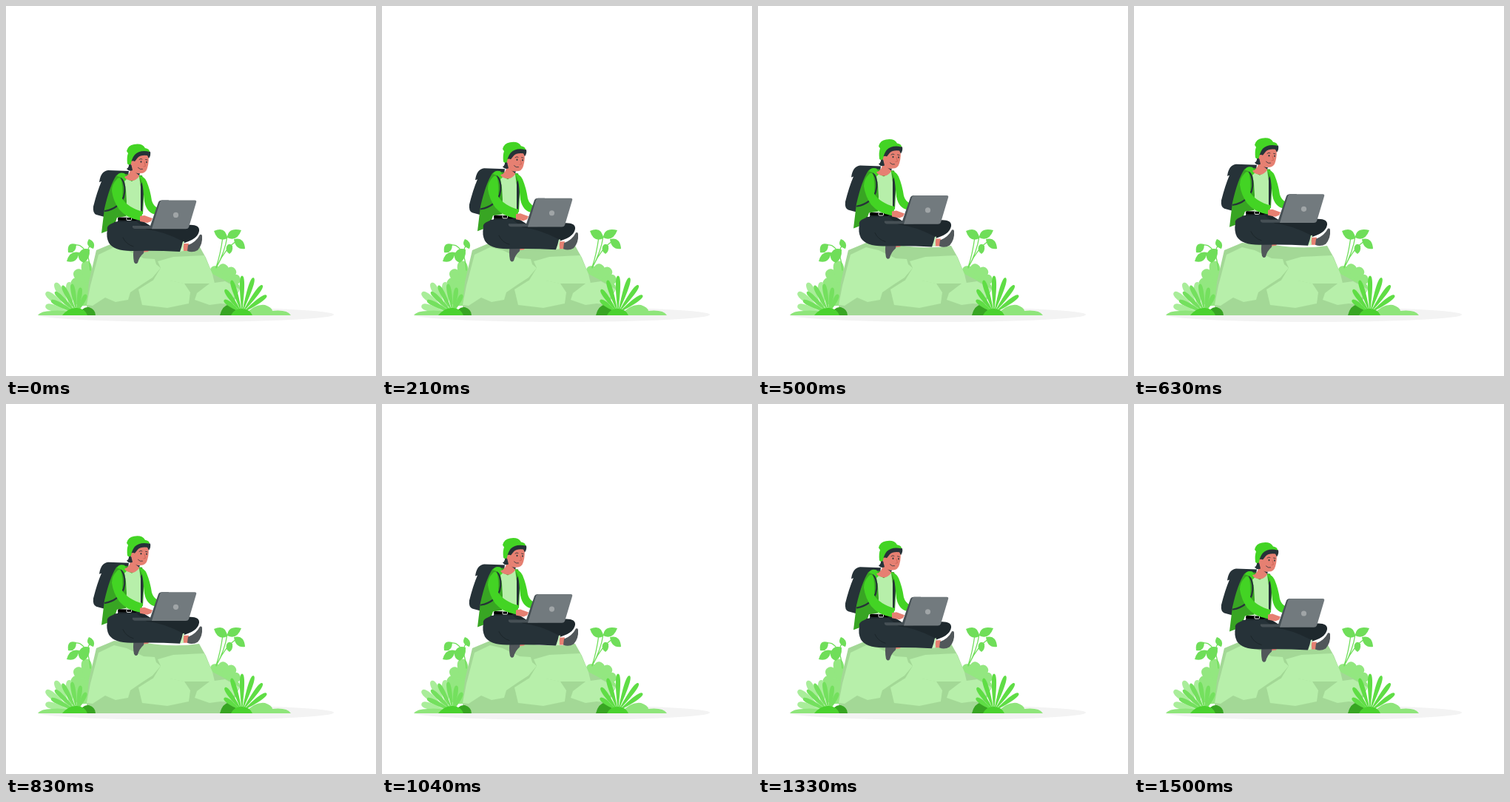
Recreate the animation shown at these times as an HTML page. Size 500 px wide and 500 px high, loop 1540 ms.

```html
<!DOCTYPE html>
<html lang="en">
<head>
<meta charset="utf-8">
<title>Working outdoors</title>
<style>
  html, body { margin: 0; width: 100%; height: 100%; overflow: hidden; background: #fff; }
  svg { display: block; width: 100%; height: 100%; }
  .bright { fill: #43d424; }
  .deep { fill: #38a523; }
  .pale { fill: #b7efaa; }
  .navy { fill: #263238; }
  .night { fill: #1e282d; }
  .skin { fill: #e68072; }
  .shoe { fill: #51575a; }
  .line { fill: none; stroke-linecap: round; stroke-linejoin: round; }
</style>
</head>
<body>
<svg viewBox="0 0 500 500">
  <ellipse cx="243" cy="417" rx="200" ry="10" fill="#f3f3f3"/>

  <g id="bushes" fill="#93e780"></g>
  <g fill="#6fde59">
    <path class="line" stroke="#6fde59" stroke-width="1.3" d="M114 357Q112 334 103 326Q98 321 91 324M109 335Q111 328 113 324M284 354Q296 332 299 311M284 353Q290 335 293 312M286 350Q296 328 312 317"/>
    <path d="M84 333Q82 318 95 322Q95 335 84 333ZM112 315Q122 319 118 328Q106 324 112 315ZM82 345Q86 330 99 333Q96 349 82 345ZM98 336Q102 325 113 329Q114 342 105 347Q97 344 98 336Z"/>
    <path d="M281 304Q297 297 299 314Q286 320 281 304ZM299 313Q300 299 318 303Q312 319 299 313ZM308 315Q322 312 323 328Q310 330 308 315ZM298 325Q301 319 306 324Q307 332 302 335Q296 331 298 325Z"/>
  </g>

  <!-- rock -->
  <path fill="#a3d896" d="M122 330L146 320L190 323Q228 329 261 324L270 340L279 362L296 371L316 382L300 418H108L112 373Z"/>
  <g class="pale">
    <path d="M125 336L146 326L163 330L186 341L201 342L203 349L209 354L198 367L184 376L168 387L165 397L148 400L134 394L117 405L109 404L114 378Z"/>
    <path d="M205 345L226 339L268 337L279 362L282 375L240 375L221 371L198 372L209 354Z"/>
    <path d="M179 383L198 371L222 371L241 375L249 387L247 402L218 408L184 404Z"/>
    <path d="M255 397L258 388L275 375L296 372L316 383L301 403L290 402L275 404Z"/>
  </g>

  <g id="traveller">
    <!-- backpack -->
    <path class="navy" d="M126 238Q128 223 138 222L166 223L163 243L160 258Q155 272 143 279L133 285L122 282Q117 280 118 271Q123 251 129 237Z"/>
    <!-- jacket and shirt -->
    <path class="deep" d="M149 229Q154 224 161 227L184 229L187 240L185 281L150 286L145 301L129 307L133 274Q140 243 149 229Z"/>
    <path class="pale" d="M159 231L170 237L180 230L183 252L182 287L162 287L163 264L162 248Z"/>
    <path class="line" stroke="#263238" stroke-width="2.2" d="M156 232Q163 244 159 258Q152 274 134 277"/>
    <path class="navy" d="M182 241L184 238L186 248L184 278L182 276Z"/>
    <path class="bright" d="M179 229Q187 230 190 237Q195 249 197 263Q199 270 205 273L203 282Q190 280 187 264L185 245Q184 235 179 229Z"/>
    <!-- far leg and belt -->
    <path class="night" d="M146 292Q162 289 184 290L195 297L246 296Q262 295 261 304Q259 316 237 321L200 325L151 309Z"/>
    <path class="night" d="M152 286L183 288L188 299L149 300Z"/>
    <path class="line" stroke="#000" stroke-width="4" d="M153 287.5L175 288"/>
    <rect x="163" y="285.4" width="6.5" height="4.2" rx="1" fill="none" stroke="#e4e7e8"/>
    <!-- feet -->
    <path class="skin" d="M184 326L195 327L192 332L184 333ZM239 321L247 321L246 331L239 331Z"/>
    <path class="shoe" d="M173 325L187 327L186 334Q180 339 178 347Q175 350 173 346Q171 336 173 325ZM246 323Q257 319 262 309Q265 308 265 311Q266 322 259 330Q252 334 245 331Z"/>
    <path fill="#c9f3bf" d="M236 319L241 318Q239 325 240 331L234 332Z"/>
    <!-- near leg -->
    <path class="navy" d="M137 302Q135 296 148 292L176 291L190 302Q212 304 239 318Q238 324 235 332Q202 330 169 331Q146 331 139 320Q135 312 137 302Z"/>
    <path class="line" stroke="#1c262a" d="M158 313Q162 322 172 325"/>
    <!-- near sleeve and collar -->
    <path class="bright" d="M149 235Q153 229 156 236Q158 247 157 260Q164 272 185 278L182 290Q163 287 153 275Q145 264 143 250Q143 241 149 235Z"/>
    <path class="bright" d="M150 230Q152 224 160 226L164 233L160 237Q157 231 150 230Z"/>
    <!-- hand and laptop -->
    <path class="skin" d="M181 284L187 283L198 287L196 291L191 293L181 291Z"/>
    <path fill="#465055" d="M171 297H195L206 265Q207 262.5 210 262.5H220L210 301H174Q170 300 171 297Z"/>
    <path fill="#727a7e" d="M197 301.3L208 265Q209 262.5 211 262.5H255Q258 262.5 257 265.5L247 299Q246 301.3 243 301.3Z"/>
    <circle cx="229.5" cy="282.5" r="3.6" fill="#a0a5a7"/>
    <!-- head -->
    <path class="skin" d="M169 217L179 221L180 230Q175 237 169 236Q162 235 160 231Q168 229 169 217Z"/>
    <path class="navy" d="M175 225Q178 227 181 226L180 229Z"/>
    <path class="skin" d="M174 202L192 199Q194 209 191 219Q189 227 180 226Q171 223 169 214Z"/>
    <path class="navy" d="M169 212Q167 201 176 196Q187 193 195 197Q196 202 193 206L191 202Q182 201 178 205L174 210L170 211Q169 216 171 222Q166 224 163 220Q167 218 166 211Z"/>
    <circle class="skin" cx="171.5" cy="212.5" r="3.2"/>
    <path class="bright" d="M164 213Q163 204 165 199L163 196Q165 188 173 187Q184 185 188 192Q194 193 194 197Q181 194 174 201Q170 206 169 213Q166 216 164 213Z"/>
    <g class="navy">
      <ellipse cx="182.5" cy="210.5" rx=".9" ry="1.3"/>
      <ellipse cx="190" cy="211" rx=".8" ry="1.3"/>
    </g>
    <path class="line" stroke="#263238" stroke-width=".8" d="M180 207.5Q182 205.5 184 207M188.5 207.5L191 208M178.5 218.5Q181 221.5 184.5 220.5"/>
    <path class="line" stroke="#c95f50" stroke-width=".8" d="M187 211L188.5 216.5L186 217"/>
  </g>

  <g id="paleFern" fill="#a9ed9a"></g>
  <path class="deep" d="M100 418Q102 406 112 407Q121 410 121 418ZM289 418Q292 405 302 403Q312 406 316 418Z"/>
  <path fill="#8fe57b" d="M43 418Q47 412 62 412Q82 410 98 418ZM323 418Q335 402 350 404Q359 407 360 412Q380 410 385 418Z"/>
  <g id="leftFern" fill="#74e05e"></g>
  <g id="rightFern" fill="#5fdd45"></g>
  <path fill="#4bd22f" d="M76 418Q85 407 96 408Q107 409 110 418ZM304 418Q308 409 319 409Q330 410 333 418Z"/>
</svg>
<script>
  const byId = id => document.getElementById(id);

  // Leaves spread evenly around one base; their length goes from first to last, with a bulge between
  function addFan(id, x, y, { count, from, to, first, last, bulge = 0, width }) {
    for (let i = 0; i < count; i++) {
      const t = i / (count - 1);
      const angle = from + (to - from) * t;
      const length = first + (last - first) * t + bulge * Math.sin(Math.PI * t);
      byId(id).innerHTML += `<path transform="translate(${x} ${y}) rotate(${angle})"
        d="M0 0C${-width * 0.3} ${-length * 0.3} ${-width} ${-length} 0 ${-length}S${width * 0.3} ${-length * 0.3} 0 0"/>`;
    }
  }

  addFan('bushes', 115, 388, { count: 4, from: -80, to: -10, first: 25, last: 44, width: 14 });
  addFan('bushes', 118, 404, { count: 3, from: -70, to: -30, first: 26, last: 36, width: 14 });
  addFan('bushes', 280, 380, { count: 5, from: 8, to: 92, first: 29, last: 36, bulge: 6, width: 14 });
  addFan('paleFern', 88, 415, { count: 4, from: -74, to: -4, first: 36, last: 42, bulge: 7, width: 9 });
  addFan('leftFern', 96, 415, { count: 6, from: -64, to: 26, first: 39, last: 28, bulge: 8, width: 6 });
  addFan('rightFern', 319, 415, { count: 7, from: -54, to: 54, first: 30, last: 41, bulge: 15, width: 6 });

  const PERIOD = 1540, RISE = 10, LOW_POINT = 1500;

  // Steady float up and down
  function draw(now) {
    const phase = ((now + PERIOD - LOW_POINT) % PERIOD) / PERIOD;
    const height = 1 - Math.abs(phase * 2 - 1);
    byId('traveller').setAttribute('transform', `translate(0 ${0.5 - RISE * height})`);
    requestAnimationFrame(draw);
  }
  draw(0);
</script>
</body>
</html>
```
